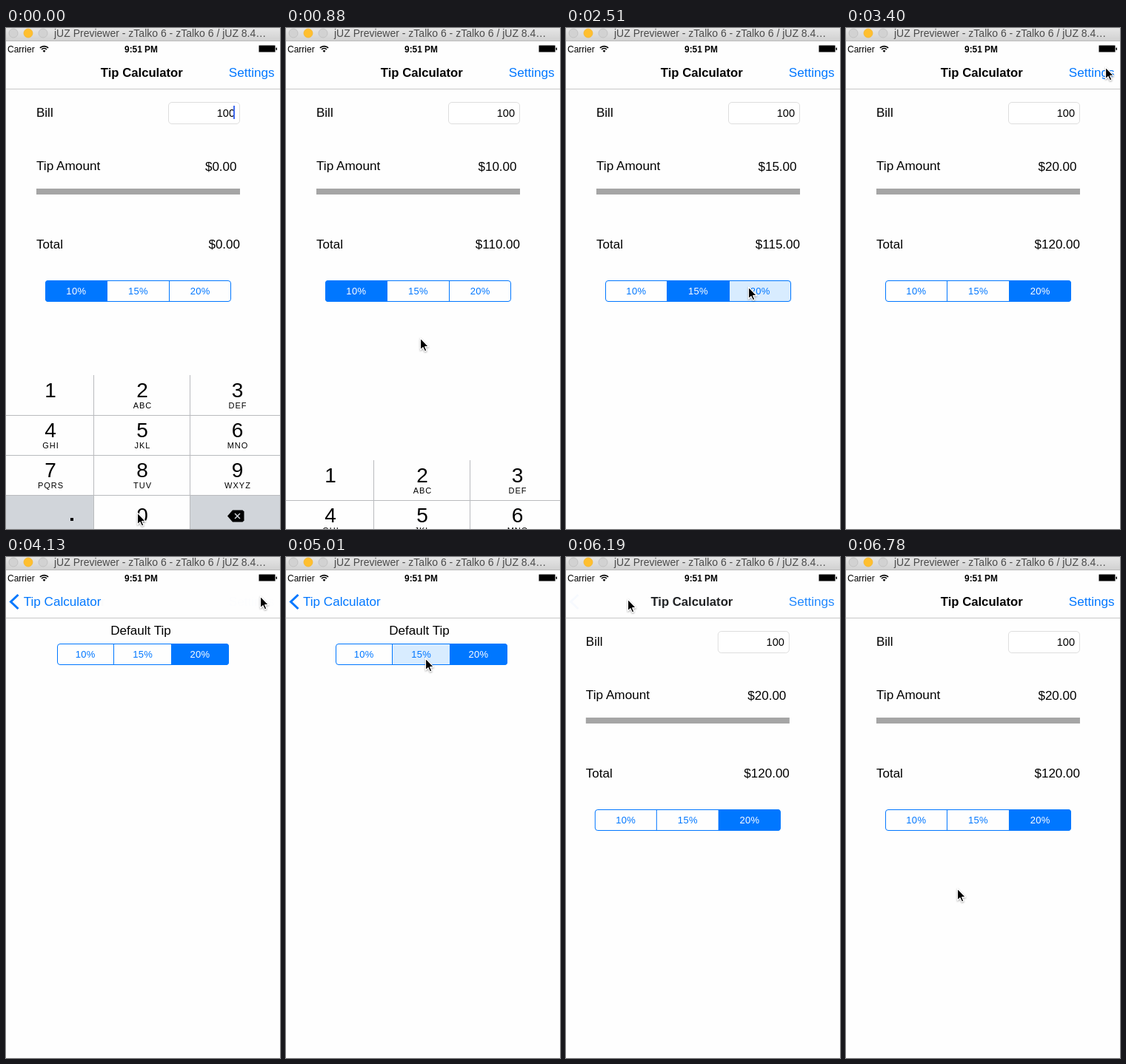
An HTML page that plays this animation: 370 px wide and 677 px high, repeating every 8000 ms.

```html
<!DOCTYPE html>
<html lang="en">
<head>
<meta charset="utf-8">
<title>Tip Calculator</title>
<style>
  html, body { margin: 0; width: 100%; height: 100%; overflow: hidden; background: #fefefe; }
  svg { display: block; width: 370px; height: 677px; font-family: "Liberation Sans", Arial, sans-serif; }
  #pointer { filter: drop-shadow(0 1px 1px rgba(0, 0, 0, .35)); }
</style>
</head>
<body>
<svg id="stage" viewBox="0 0 370 677">
  <defs>
    <linearGradient id="chrome" x2="0" y2="1">
      <stop offset="0" stop-color="#e6e6e6"/>
      <stop offset="1" stop-color="#d0d0d0"/>
    </linearGradient>
  </defs>
  <g id="pages"></g>
  <g id="nav"></g>
  <g id="keyboard"></g>
  <g id="chromeBar"></g>
  <path id="pointer" d="M.5 -1V15L4 11.700L6.500 17L9 15.900L6.700 10.700H11.500Z"
        stroke="#fff" stroke-width="1.2" stroke-linejoin="round"/>
</svg>
<script>
const LOOP = 8000, STEP = 147.4;
const BLUE = '#0077ff', PAPER = '#fefefe';
const $ = id => document.getElementById(id);

// Steps at which the user acts.
const DISMISS = 5, PICK_15 = 12, PICK_20 = 18, OPEN = 24, PICK_DEFAULT = 35, BACK = 39;

const HOME = { x: 177, y: 656 };
const MOVES = [
  { from: 0, to: 4, x: 181, y: 420 },
  { from: 8, to: 11, x: 179, y: 357 },
  { from: 12, to: 15, x: 246, y: 351 },
  { from: 18, to: 21, x: 350, y: 54 },
  { from: 27, to: 28, x: 343, y: 54 },
  { from: 28, to: 33, x: 188, y: 138 },
  { from: 35, to: 38, x: 83, y: 58 },
  { from: 43, to: 46, x: 150, y: 449 }
];

const clamp = u => Math.max(0, Math.min(1, u));
const ease = u => u * u * (3 - 2 * u);
const settle = steps => 1 - Math.exp(-1.47 * Math.max(0, steps));
const pushProgress = n => settle(n - OPEN - .6) - settle(n - BACK - 1.6);

function pointerAt(n) {
  return MOVES.reduce((p, m) => {
    const u = ease(clamp((n - m.from) / (m.to - m.from)));
    return { x: p.x + (m.x - p.x) * u, y: p.y + (m.y - p.y) * u };
  }, HOME);
}

const text = (x, y, s, size = 17, attrs = '') =>
  `<text x="${x}" y="${y}" font-size="${size}" ${attrs}>${s}</text>`;
const rect = (x, y, w, h, fill, attrs = '') =>
  `<rect x="${x}" y="${y}" width="${w}" height="${h}" fill="${fill}" ${attrs}/>`;
const group = (x, y, body, opacity = 1) =>
  `<g transform="translate(${x} ${y})" opacity="${opacity}">${body}</g>`;
const END = 'text-anchor="end"', MID = 'text-anchor="middle"';

function segments(id, x, y, w, selected, pressed) {
  const cell = w / 3, left = Math.round(x), width = Math.round(w);
  const edge = i => Math.floor(x + cell * i);
  let fills = '', lines = '', labels = '';
  ['10%', '15%', '20%'].forEach((label, i) => {
    const fill = i === selected ? BLUE : i === pressed ? '#d8ecff' : PAPER;
    fills += rect(edge(i), y, edge(i + 1) - edge(i) + 1, 29, fill);
    if (i) lines += rect(edge(i), y, 1, 29, BLUE);
    labels += text(x + cell * (i + .5), y + 19, label, 13,
      `${MID} letter-spacing=".3" fill="${i === selected ? '#fff' : BLUE}"`);
  });
  return `<clipPath id="${id}">${rect(left, y, width, 29, '#000', 'rx="4"')}</clipPath>
    <g clip-path="url(#${id})">${fills}${lines}</g>
    ${rect(left + .5, y + .5, width - 1, 28, 'none', `rx="3.5" stroke="${BLUE}"`)}${labels}`;
}

function billPage(n) {
  const choice = (n >= PICK_15) + (n >= PICK_20);
  const pressed = n === PICK_20 - 1 ? 2 : n < PICK_15 && n >= PICK_15 - 2 ? 1 : -1;
  const tip = n > DISMISS ? 10 + 5 * choice : 0;
  const total = tip ? 100 + tip : 0;
  return text(41, 120, 'Bill') +
    rect(219.5, 100.5, 96, 29, '#fff', 'rx="4.5" stroke="#dedede"') +
    text(309, 120, '100', 14.5, END) +
    rect(307, 105, 2, 18, '#416bf0', `opacity="${clamp(1 - n * .35)}"`) +
    text(41, 191.5, 'Tip Amount', 17.2) +
    text(311.5, 193, '$' + tip.toFixed(2), 17, END) +
    rect(41, 217, 275, 8, '#a5a5a5') +
    text(41, 298, 'Total') +
    text(316, 298, '$' + total.toFixed(2), 17, END) +
    segments('billClip', 53, 341, 251, choice, pressed);
}

function settingsPage(n) {
  const picked = n >= PICK_DEFAULT ? 1 : 2;
  return rect(-4, 83, 374, 594, PAPER) +
    text(180, 104.5, 'Default Tip', 17.1, MID) +
    segments('settingsClip', 66.6, 117, 232, picked, n === PICK_DEFAULT - 1 ? 1 : -1);
}

function navBar(n, p) {
  const settingsAlpha = (1 - p) * (n === OPEN ? .25 : 1);
  const backAlpha = p * (n >= BACK ? .22 : 1);
  const back = `<path d="M16.5 51L6.5 60.5L16.5 70" fill="none" stroke="${BLUE}" stroke-width="3"/>` +
    text(23 + 105 * (1 - p), 66, 'Tip Calculator', 17.1, `fill="${BLUE}"`);
  return rect(0, 18, 370, 64, PAPER) + rect(0, 82, 370, 1, '#c8c8c8') +
    group(-105 * p, 0, text(183.3, 66, 'Tip Calculator', 16.7, `${MID} font-weight="700"`), 1 - p) +
    group(0, 0, text(362.5, 66, 'Settings', 17.1, `${END} fill="${BLUE}"`), settingsAlpha) +
    group(0, 0, back, backAlpha);
}

function keyboard() {
  const letters = ['', 'ABC', 'DEF', 'GHI', 'JKL', 'MNO', 'PQRS', 'TUV', 'WXYZ'];
  const centers = [60, 184, 312.5];
  let out = rect(0, 469, 370, 208, PAPER) +
    rect(0, 631, 118, 46, '#d1d5da') + rect(249, 631, 121, 46, '#d1d5da');
  letters.forEach((s, i) => {
    const x = centers[i % 3], y = 469 + 54 * Math.floor(i / 3);
    out += text(x, y + 30, i + 1, 28, MID) +
      text(x + .5, y + 45, s, 11, `${MID} letter-spacing="1"`);
  });
  for (const y of [523, 577, 631]) out += rect(0, y, 370, 1, '#b9bbbe');
  for (const x of [118, 248]) out += rect(x, 469, 1, 208, '#b9bbbe');
  return out + text(184, 668, '0', 28, MID) + rect(87, 662, 4, 4, '#000') +
    `<path d="M299 659.5L306 651.5H319.500L321.500 653.500V665.500L319.500 667.500H306Z"/>
     <path d="M309 656L316 663M316 656L309 663" stroke="#d1d5da" stroke-width="1.5"/>`;
}

function chromeBar() {
  const dot = (x, fill, edge) =>
    `<circle cx="${x}" cy="7" r="6" fill="${fill}" stroke="${edge}" stroke-width=".8"/>`;
  const arc = r => {
    const d = r * .7;
    return `<path d="M${51.5 - d} ${32.5 - d}A${r} ${r} 0 0 1 ${51.5 + d} ${32.5 - d}" fill="none" stroke="#000" stroke-width="1.7"/>`;
  };
  return rect(0, 0, 370, 18, 'url(#chrome)') + rect(0, 17, 370, 1, '#bcbcbc') +
    dot(10, '#d2d2d2', '#bdbdbd') + dot(30, '#ffbf2f', '#f3b52e') + dot(50, '#d2d2d2', '#bdbdbd') +
    text(65, 12, 'jUZ Previewer - zTalko 6 - zTalko 6 / jUZ 8.4…', 14, 'fill="#4b4b4b"') +
    text(2, 33, 'Carrier', 12) + text(182.5, 32.5, '9:51 PM', 11.9, `${MID} font-weight="700"`) +
    arc(8) + arc(5) + '<path d="M51.500 33L49.500 30.800Q51.500 29 53.500 30.800Z"/>' +
    rect(341, 23, 23, 10, '#808080', 'rx="1.5"') + rect(342, 24, 21, 8, '#000') +
    rect(364.5, 26.5, 1.5, 3.5, '#000', 'rx=".7"');
}

function draw(n) {
  const p = pushProgress(n);
  const { x, y } = pointerAt(n);
  $('pages').innerHTML = group(-111 * p, 0, billPage(n)) +
    group(Math.round(370 * (1 - p)), 0, settingsPage(n));
  $('nav').innerHTML = navBar(n, p);
  $('keyboard').setAttribute('transform', `translate(0 ${115 * Math.max(0, n - DISMISS)})`);
  $('pointer').setAttribute('transform', `translate(${x} ${y})`);
}

$('keyboard').innerHTML = keyboard();
$('chromeBar').innerHTML = chromeBar();

const start = performance.now();
let shown = -1;
function tick() {
  const t = (performance.now() - start) % LOOP;
  const n = Math.floor((t + 5) / STEP);
  if (n !== shown) draw(shown = n);
  requestAnimationFrame(tick);
}
tick();
</script>
</body>
</html>
```
